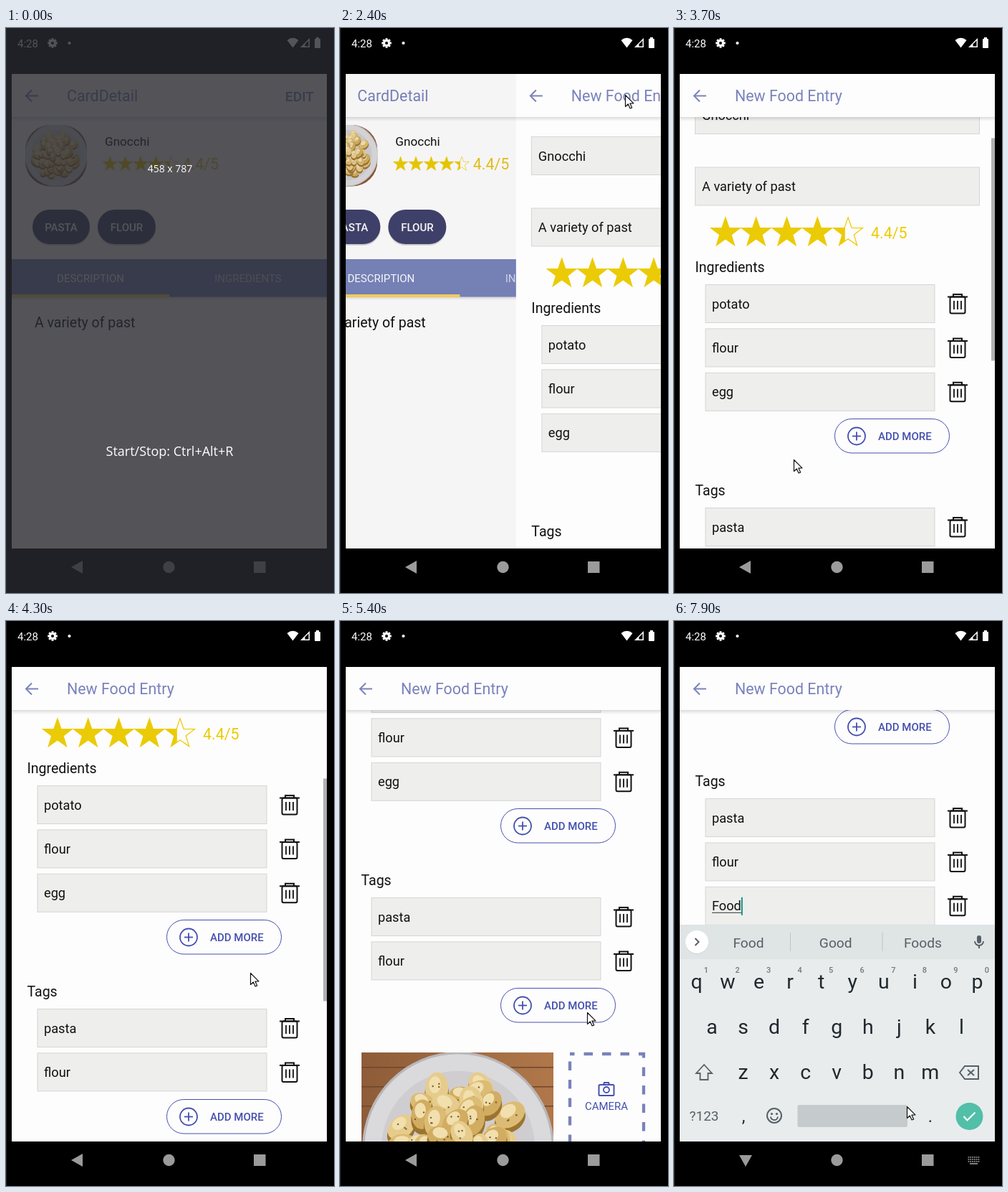
An HTML page with a canvas for the animation above (8000 ms loop, 458 by 787 pixels).

```html
<!DOCTYPE html>
<html lang="en">
<head>
<meta charset="utf-8">
<title>Food card editor</title>
<style>
html, body { margin: 0; height: 100%; overflow: hidden; background: #000; }
canvas { display: block; }
</style>
</head>
<body>
<canvas id="stage" width="458" height="787"></canvas>
<script>
const ctx = document.getElementById('stage').getContext('2d');
const LOOP = 8000, STEP = 100, TAU = Math.PI * 2;
const INK = '#111', LILAC = '#7982bc', INDIGO = '#4450ae', GOLD = '#ebcb05', PAGE = '#fefdfd';
const ROW = 61.4;

// ---------- helpers ----------
function text(s, x, y, size, color, { weight = 400, align = 'left', family = 'Roboto' } = {}) {
  ctx.font = `${weight} ${size}px ${family}, sans-serif`;
  ctx.textAlign = align;
  ctx.fillStyle = color;
  ctx.fillText(s, x, y);
  return ctx.measureText(s).width;
}
function rect(x, y, w, h, color) {
  ctx.fillStyle = color;
  ctx.fillRect(x, y, w, h);
}
function pill(x, y, w, h, r, fill, stroke) {
  ctx.beginPath();
  ctx.roundRect(x, y, w, h, r);
  paint(fill, stroke);
}
function disc(x, y, r, fill, stroke, width) {
  ctx.beginPath();
  ctx.arc(x, y, r, 0, TAU);
  paint(fill, stroke, width);
}
function paint(fill, stroke, width = 1) {
  if (fill) { ctx.fillStyle = fill; ctx.fill(); }
  if (stroke) { ctx.strokeStyle = stroke; ctx.lineWidth = width; ctx.stroke(); }
}
// shape('0,0 5,5', ...) draws a path through points given relative to x, y
function shape(points, x, y, { fill, stroke, width = 2, close = !!fill } = {}) {
  ctx.beginPath();
  for (const p of points.split(' ')) {
    const [dx, dy] = p.split(',').map(Number);
    ctx.lineTo(x + dx, y + dy);
  }
  if (close) ctx.closePath();
  paint(fill, stroke, width);
}
function layer(draw, { x = 0, y = 0, clip, alpha = 1 } = {}) {
  ctx.save();
  if (clip) { ctx.beginPath(); ctx.rect(...clip); ctx.clip(); }
  ctx.translate(x, y);
  ctx.globalAlpha = alpha;
  draw();
  ctx.restore();
}
function shadow(y, h, strength) {
  const g = ctx.createLinearGradient(0, y, 0, y + h);
  g.addColorStop(0, `rgba(0,0,0,${strength})`);
  g.addColorStop(1, 'rgba(0,0,0,0)');
  rect(8, y, 440, h, g);
}
// Linear keyframes: [[time, value, ...], ...]
function track(t, keys) {
  let a = keys[0];
  for (const b of keys) {
    if (t < b[0]) {
      const k = Math.max(0, (t - a[0]) / (b[0] - a[0] || 1));
      return a.slice(1).map((v, i) => v + (b[i + 1] - v) * k);
    }
    a = b;
  }
  return a.slice(1);
}

// ---------- motion ----------
const cursorKeys = [
  [800, 301, 8], [900, 335, 27], [1000, 335, 27], [1400, 400, 93], [1600, 400, 93], [1700, 398, 93],
  [3200, 398, 93], [3500, 172, 662], [3600, 167, 655], [3700, 167, 601], [3900, 167, 560],
  [4000, 167, 560], [4200, 341, 560], [4300, 341, 490], [4400, 341, 400], [4500, 341, 345],
  [4600, 341, 322], [4700, 342, 322], [4900, 342, 322], [5400, 345, 545], [5500, 345, 545],
  [5800, 313, 531], [5900, 313, 531], [6200, 173, 531], [7600, 173, 531],
  [7700, 135, 640], [7800, 386, 680], [7900, 325, 676]];
const scrollKeys = [
  [3500, 0], [3600, 6], [3700, 57], [3800, 105], [3900, 130], [4200, 130], [4300, 185], [4400, 260],
  [4500, 308], [4600, 333], [4700, 338], [4900, 340], [6700, 340], [6800, 430], [6900, 478]];
const barKeys = [[2800, 1], [3200, 0], [3400, 0], [3500, 1], [5000, 1], [5400, 0], [6700, 0], [6800, 1], [7100, 1], [7500, 0]];

// Critically damped spring for the screen change
function pushProgress(t) {
  if (t < 2400) return 0;
  const w = 18.26 * (t - 2315) / 1000;
  return w > 10 ? 1 : 1 - (1 + w) * Math.exp(-w);
}

// ---------- parts ----------
function food(cx, cy, r, seed) {
  const rnd = () => (seed = (seed * 16807) % 2147483647) / 2147483647;
  disc(cx, cy, r, '#b9b6b8');
  disc(cx, cy, r * .975, '#dad9dc');
  disc(cx, cy, r * .8, '#cfcdcf');
  const blobs = 44;
  for (let i = blobs; i > 0; i--) {
    const a = i * 2.4 + rnd() * .5, d = r * .68 * Math.sqrt(i / blobs);
    const x = cx + d * Math.cos(a), y = cy + d * Math.sin(a), tilt = rnd() * 3;
    const w = r * (.135 + rnd() * .05), h = w * .72;
    [['#9c7430', 0, .05, 1], [['#dcbc74', '#d2ac60', '#e6cc8c'][i % 3], 0, 0, .96], ['#f1dfae', -.02, -.04, .5]]
      .forEach(([color, dx, dy, k]) => {
        ctx.beginPath();
        ctx.ellipse(x + dx * r, y + dy * r, w * k, h * k, tilt, 0, TAU);
        paint(color);
      });
    for (let n = 0; n < 3; n++)
      disc(x + (rnd() - .5) * w, y + (rnd() - .5) * h, r * .009, '#7c6128');
  }
}
function stars(x, cy, step, rating) {
  for (let i = 0; i < 5; i++) {
    const cx = x + step * (i + .5), r = step * .5;
    const star = new Path2D();
    for (let k = 0; k < 10; k++) {
      const a = k * Math.PI / 5 - Math.PI / 2, d = k % 2 ? r * .4 : r;
      star.lineTo(cx + d * Math.cos(a), cy + r * .06 + d * Math.sin(a));
    }
    star.closePath();
    layer(() => {
      ctx.fillStyle = GOLD;
      ctx.fill(star);
    }, { clip: [cx - r, cy - step, step * Math.min(1, Math.max(0, rating - i)), step * 2] });
    ctx.strokeStyle = GOLD;
    ctx.lineWidth = step / 34;
    ctx.stroke(star);
  }
}
function header(title, action) {
  shadow(124, 6, .13);
  rect(8, 64, 440, 60, PAGE);
  shape('17,0 1,0', 28, 94.5, { stroke: LILAC });
  shape('8.5,-8 0.5,0 8.5,8', 27.5, 94.5, { stroke: LILAC });
  text(title, 85, 102, 21.4, LILAC);
  if (action) text(action, 430, 102, 19.2, LILAC, { weight: 500, align: 'right' });
}
function chip(label, x, w) {
  pill(x, 255, w, 48, 24, 'rgba(0,0,0,.16)');
  pill(x, 253, w, 48, 24, '#41426c');
  text(label, x + w / 2, 283, 15, '#fff', { weight: 500, align: 'center' });
}
function detailScreen() {
  rect(8, 64, 440, 661, PAGE);
  header('CardDetail', 'EDIT');
  ctx.save();
  ctx.beginPath();
  ctx.roundRect(27, 135, 86, 85.5, 35);
  ctx.clip();
  rect(27, 135, 86, 86, '#8f5233');
  food(70, 177, 44, 71);
  ctx.restore();
  text('Gnocchi', 138, 164, 17.1, INK);
  stars(134.5, 189, 21.4, 4.4);
  text('4.4/5', 246.5, 197, 21.4, '#e6c31c');
  chip('PASTA', 37, 80);
  chip('FLOUR', 128, 81);
  shadow(374, 5, .16);
  rect(8, 322, 440, 52.5, '#7984bb');
  text('DESCRIPTION', 118, 354, 15, '#fff', { align: 'center' });
  text('INGREDIENTS', 338, 354, 15, 'rgba(255,255,255,.7)', { align: 'center' });
  rect(8, 371, 220, 4, '#f6d35f');
  text('A variety of past', 40, 417, 19.5, INK);
}

function field(x, y, w) {
  rect(x, y, w, 54, '#d5d5d5');
  rect(x + 1, y + 1, w - 2, 52, '#eeeeed');
}
function itemRow(label, y, color = INK) {
  field(43.5, y, 321);
  const c = y + 27;
  shape('-14,-9.5 14,-9.5', 396, c, { stroke: '#111' });
  shape('-6,-10 -6,-13 6,-13 6,-10', 396, c, { stroke: '#111' });
  pill(385.5, c - 9.5, 21, 23, 2);
  paint(null, '#111', 2);
  for (const dx of [-5, 0, 5]) shape('0,-4 0,8', 396 + dx, c, { stroke: '#111', width: 1.8 });
  return text(label, 53, y + 33.5, 18.2, color);
}
function addMore(y) {
  pill(224.5, y, 160, 47.5, 23.7, PAGE, INDIGO);
  disc(255, y + 24, 12, null, INDIGO, 1.8);
  shape('-6,0 6,0', 255, y + 24, { stroke: INDIGO, width: 1.8 });
  shape('0,-6 0,6', 255, y + 24, { stroke: INDIGO, width: 1.8 });
  text('ADD MORE', 285, y + 29.5, 15, INDIGO, { weight: 500 });
}
function entryForm(t) {
  field(29, 151, 398);
  text('Gnocchi', 39, 185, 18.2, INK);
  field(29, 250.5, 398);
  text('A variety of past', 39, 284, 18.2, INK);
  stars(50.5, 341, 42.8, 4.4);
  text('4.4/5', 275, 350, 21.4, GOLD);
  text('Ingredients', 29.5, 397, 19.5, INK);
  ['potato', 'flour', 'egg'].forEach((s, i) => itemRow(s, 414 + ROW * i));
  addMore(601.5);
  text('Tags', 29.5, 708, 19.5, INK);
  ['pasta', 'flour'].forEach((s, i) => itemRow(s, 725 + ROW * i));

  const added = t >= 5600 ? ROW : 0;
  if (added) {
    const y = 725 + 2 * ROW;
    const typed = 'Food'.slice(0, Math.max(0, Math.floor((t - 7100) / 100)));
    const width = itemRow(typed || 'Tag', y, typed ? INK : '#9a9a9a');
    if (typed) rect(53, y + 36, width, 1, '#333');
    if (t >= 6200) rect(53 + (typed ? width : 0), y + 15, 2, 25, '#129684');
  }
  addMore(851.5 + added);

  const top = 941 + added;
  layer(() => {
    const wood = ctx.createLinearGradient(30, 0, 298, 0);
    wood.addColorStop(0, '#8d5c38');
    wood.addColorStop(1, '#b0774a');
    rect(30, top, 268, 190, wood);
    for (let i = 0; i < 3; i++) rect(30, top + 20 + i * 27, 268, 1.5, '#71462b');
    food(165, top + 133, 134, 71);
  }, { clip: [30, top, 268, 190] });
  ctx.setLineDash([12.5, 13]);
  ctx.lineDashOffset = 6;
  ctx.strokeStyle = LILAC;
  ctx.lineWidth = 4.3;
  ctx.strokeRect(321, top + 2, 103, 186);
  ctx.setLineDash([]);
  pill(361.5, top + 45, 21, 15, 1.5);
  paint(null, INDIGO, 2);
  shape('-4,0 -3,-3 3,-3 4,0', 372, top + 45, { stroke: INDIGO });
  disc(372, top + 52, 4, null, INDIGO, 1.8);
  text('CAMERA', 372, top + 80, 15, INDIGO, { align: 'center' });
}
function entryScreen(t) {
  const [scroll] = track(t, scrollKeys), [barAlpha] = track(t, barKeys);
  const view = t >= 6700 ? 299 : 601, content = 1165 + (t >= 5600 ? ROW : 0);
  rect(8, 64, 440, 661, PAGE);
  layer(() => entryForm(t), { y: -scroll, clip: [8, 124, 440, 601] });
  layer(() => rect(443, 124 + scroll * view / content, 5, view * view / content, '#b1b1b1'), { alpha: barAlpha });
  header('New Food Entry');
}

function mic(x, y, color) {
  pill(x - 3, y - 9, 6, 11, 3, color);
  ctx.beginPath();
  ctx.arc(x, y - 1, 6, 0, Math.PI);
  paint(null, color, 1.8);
  shape('0,5 0,9', x, y, { stroke: color });
}
function toolbar(color) {
  disc(90, 445, 5.5, null, color, 2);
  shape('4,4 10,10', 90, 445, { stroke: color, width: 2.4 });
  pill(147.5, 439, 16, 16, 3);
  paint(null, color, 2);
  disc(152.5, 445, 1.2, color);
  disc(158.5, 445, 1.2, color);
  ctx.beginPath();
  ctx.arc(155.5, 447, 4, .2, 2.9);
  paint(null, color, 1.6);
  text('GIF', 219, 452, 14, color, { weight: 900, align: 'center' });
  rect(277, 438, 17, 17, color);
  rect(324, 435, 1, 25, '#c3c9cb');
  for (const x of [357, 363.5, 370]) disc(x, 447, 2.1, color);
}
function keyboard(typing) {
  const key = '#20292e', soft = '#566067', middle = { align: 'center' };
  rect(8, 423, 440, 302, '#e8eced');
  rect(8, 423, 440, 48, '#dfe4e5');
  disc(32, 448, 16, '#cdd2d4');
  disc(32, 447, 16, '#fff');
  shape(typing ? '-2.5,-5 2.5,0 -2.5,5' : '2.5,-5 -2.5,0 2.5,5', 32, 447, { stroke: soft });
  if (typing) {
    ['Food', 'Good', 'Foods'].forEach((s, i) => text(s, 104 + 121.7 * i, 454.5, 19.2, soft, middle));
    for (const x of [162, 290.5]) rect(x, 434, 1, 26, '#c0c6c8');
  } else toolbar(soft);
  mic(426, 447, soft);

  [['QWERTYUIOP', 31.5, 512], ['ASDFGHJKL', 53, 574.5], ['ZXCVBNM', 96.5, 637.5]].forEach(([letters, x, y], r) =>
    [...letters].forEach((c, i) => {
      text(typing ? c.toLowerCase() : c, x + 43.55 * i, y, 28.5, key, middle);
      if (!r) text((i + 1) % 10, 45 + 43.55 * i, 490, 11, '#6f797f', { weight: 500, align: 'center' });
    }));
  shape('0,-11 11,1 5.5,1 5.5,10 -5.5,10 -5.5,1 -11,1', 42, 629,
    { fill: typing ? '#e8eced' : soft, stroke: soft, width: 1.8 });
  shape('-13,0 -6,-9 13,-9 13,9 -6,9', 412, 629, { stroke: soft, close: true });
  shape('-2,-4 7,4', 412, 629, { stroke: soft });
  shape('7,-4 -2,4', 412, 629, { stroke: soft });

  text('?123', 42, 696, 19, soft, middle);
  text(',', 97, 698, 24, key, middle);
  text('.', 358, 698, 24, key, middle);
  disc(140, 689, 10, null, soft, 2);
  disc(136.5, 686.5, 1.6, soft);
  disc(143.5, 686.5, 1.6, soft);
  ctx.beginPath();
  ctx.arc(140, 690, 5, .1, 3.04);
  paint(null, soft, 2);
  pill(172.5, 674, 153.5, 31, 3, '#c5cacd');
  disc(412.5, 690, 19, '#52bfa8');
  shape('-8,0 -3,5.5 8,-5.5', 412.5, 690, { stroke: '#fff', width: 2.2 });
}

function statusBar() {
  text('4:28', 16, 27, 15, '#fff');
  for (let k = 0; k < 8; k++) {
    const a = k * TAU / 8;
    shape(`0,0 ${6.8 * Math.cos(a)},${6.8 * Math.sin(a)}`, 65, 21, { stroke: '#fff', width: 3 });
  }
  disc(65, 21, 3.6, null, '#fff', 3);
  disc(65, 21, 2, '#000');
  disc(88.5, 21, 2.1, '#fff');
  ctx.beginPath();
  ctx.moveTo(400.5, 27.5);
  ctx.lineTo(392.5, 17);
  ctx.quadraticCurveTo(400.5, 10.5, 408.5, 17);
  paint('#fff');
  shape('0,0 0,-13 -13,0', 424, 27, { fill: '#fff' });
  shape('0,0 0,-8 -5,-3 -5,0', 422.5, 25.5, { fill: '#000' });
  pill(431, 15, 8, 13, 1, '#fff');
  rect(433, 13, 4, 3, '#fff');
}
function navIcons(turn, hasKeyboard) {
  const grey = '#9b9b9b';
  ctx.save();
  ctx.translate(100, 751);
  ctx.rotate(-turn * Math.PI / 2);
  shape('-9,0 7,-9 7,9', 0, 0, { fill: grey });
  ctx.restore();
  disc(227.5, 751, 8.2, grey);
  rect(346, 743, 16.5, 16, grey);
  if (!hasKeyboard) return;
  for (let r = 0; r < 3; r++)
    for (let c = 0; c < 6; c++) rect(410.5 + c * 2.8, 746 + r * 3, 1.8, 1.8, '#8c8c8c');
  rect(413, 755, 11, 1.8, '#8c8c8c');
}
function cursor(t) {
  if (t < 800) return;
  const [x, y] = track(t, cursorKeys), k = t < 1700 ? .85 : 1;
  ctx.save();
  ctx.translate(x + .5, y + .5);
  ctx.scale(k, k);
  ctx.lineJoin = 'round';
  shape('0,0 0,16 3.8,12.5 6.6,18.5 9.2,17.4 6.4,11.6 11.4,11.4', 0, 0, { fill: '#fff', stroke: '#111', width: 1.2 });
  ctx.restore();
}

// ---------- scene ----------
function draw(t) {
  rect(0, 0, 458, 787, '#000');
  rect(0, 0, 1, 787, '#242424');
  statusBar();
  const p = pushProgress(t);
  const screen = [8, 64, 440, 661];
  if (p < 1) layer(detailScreen, { x: -132 * p, clip: screen });
  if (p > 0) {
    layer(() => rect(8, 64, 440, 661, '#000'), { alpha: .07 * p });
    layer(() => entryScreen(t), { x: 440 * (1 - p), clip: screen });
  }
  const keysUp = t >= 6600;
  if (keysUp) {
    const [y, alpha] = track(t, [[6600, 28, .66], [6700, 6, .93], [6800, 0, 1]]);
    layer(() => keyboard(t >= 7200), { y, alpha });
  }
  navIcons(track(t, [[6500, 0], [6600, .1], [6800, 1]])[0], keysUp);
  cursor(t);
  if (t < 100) {
    rect(0, 0, 458, 787, 'rgba(40,42,48,.8)');
    const hint = { align: 'center', family: 'Open Sans' };
    text('458 x 787', 229, 201, 14, '#fff', hint);
    text('Start/Stop: Ctrl+Alt+R', 228.5, 596, 18, '#fff', hint);
  }
}
function tick() {
  draw(Math.floor(performance.now() % LOOP / STEP) * STEP);
  requestAnimationFrame(tick);
}
tick();
</script>
</body>
</html>
```
